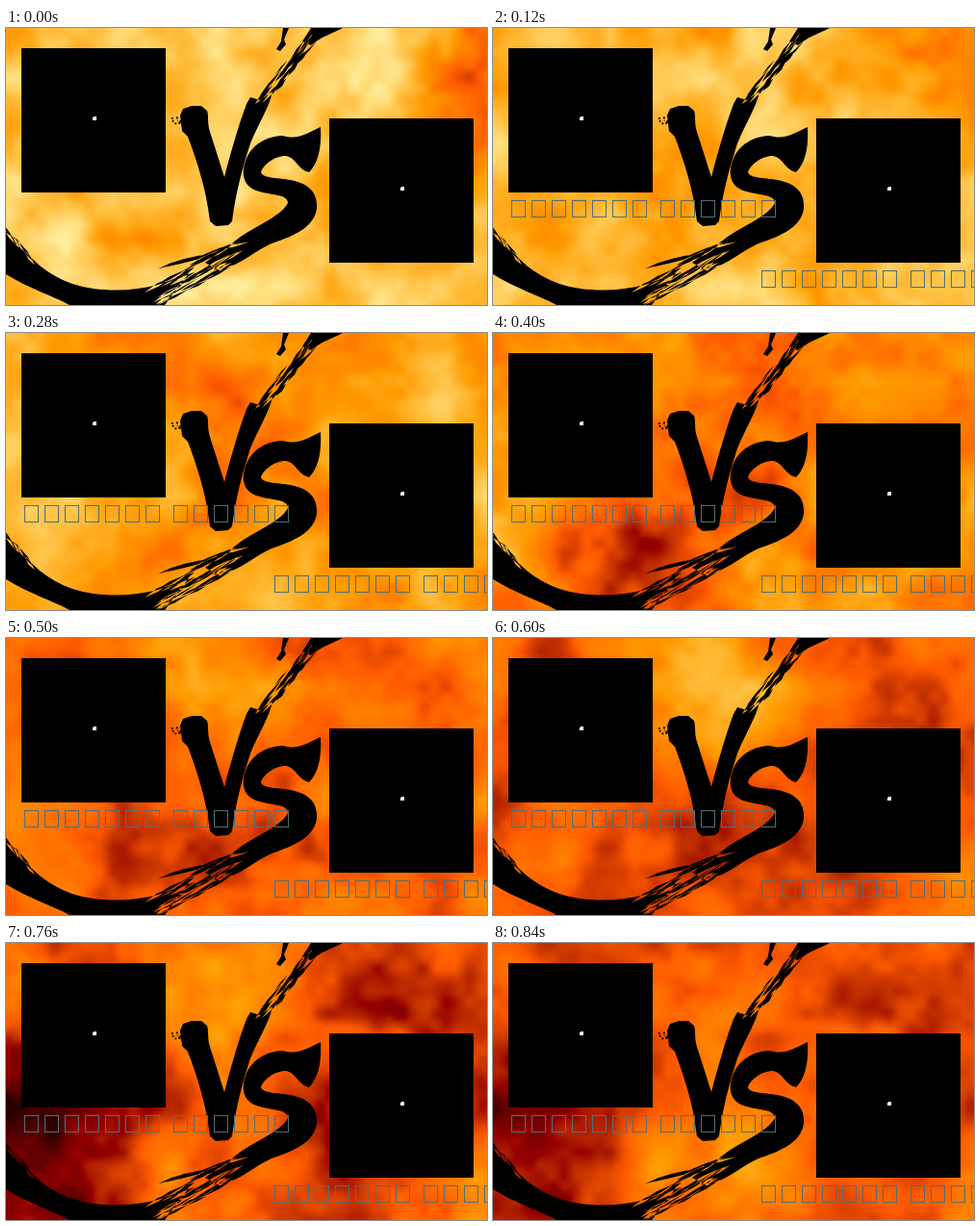
These frames come from a looping animation (500x288 px, 0.86 s). An HTML page with a canvas:

```html
<!DOCTYPE html>
<html lang="en">
<head>
<meta charset="utf-8">
<title>VS</title>
<style>
  html, body { margin: 0; width: 100%; height: 100%; overflow: hidden; background: #000; }
  canvas { display: block; width: 500px; height: 288px; }
</style>
</head>
<body>
<canvas id="stage" width="500" height="288"></canvas>
<script>
const LOOP = 860, STEP = 20, CELL = 4, W = 125, H = 72;
const ctx = document.getElementById('stage').getContext('2d');
const fire = document.createElement('canvas');
fire.width = W;
fire.height = H;
const fireCtx = fire.getContext('2d');
const pixels = fireCtx.createImageData(W, H);

let seed = 7;
const random = () => (seed = seed * 16807 % 2147483647) / 2147483647;
const between = (a, b) => a + (b - a) * random();
const mix = (a, b, k) => a + (b - a) * k;
const ease = k => k * k * (3 - 2 * k);
const clamp = (v, lo, hi) => Math.max(lo, Math.min(hi, v));

// Value noise that changes over time
const lattice = Float32Array.from({ length: 4096 }, random);
function noise(x, y, z) {
  const i = Math.floor(x), j = Math.floor(y), k = Math.floor(z);
  const u = ease(x - i), v = ease(y - j);
  const at = (a, b, c) => lattice[(a * 37 + b * 613 + c * 1291) & 4095];
  const layer = c => mix(mix(at(i, j, c), at(i + 1, j, c), u),
                         mix(at(i, j + 1, c), at(i + 1, j + 1, c), u), v);
  return mix(layer(k), layer(k + 1), z - k) - 0.5;
}

// Passing flares and cool patches
const SPOTS = [
  { x: 495, y: 60, t: 40, heat: -3 },
  { x: 350, y: 60, t: 0, heat: 1.2 },
  { x: 240, y: 100, t: 330, heat: -1.8 },
  { x: 140, y: 220, t: 400, heat: -2 },
  { x: 10, y: 200, t: 370, heat: 1.5 },
  { x: 220, y: 50, t: 640, heat: 2.6 },
  { x: 500, y: 270, t: 680, heat: 2.4 },
  { x: 310, y: 190, t: 680, heat: -1.8 },
  { x: 10, y: 200, t: 790, heat: -2.4 },
  { x: 260, y: 230, t: 850, heat: 3 }
];
const bell = (d, width) => Math.exp(-((d / width) ** 2));

// Heat runs from 0 (dark red) to 9 (pale yellow)
function heatColor(h) {
  return [
    Math.min(255, 40 + 56 * h),
    236 * (Math.max(0, h - 2) / 7) ** 0.72,
    155 * (Math.max(0, h - 5.8) / 3.2) ** 1.1
  ];
}

function drawFire(t) {
  const base = 5.3 + 2 * Math.cos(Math.PI * t / 780), z = t / 130;
  const active = SPOTS.map(s => ({ ...s, heat: s.heat * bell(t - s.t, 130) }));
  for (let y = 0, p = 0; y < H; y++) {
    for (let x = 0; x < W; x++, p += 4) {
      let h = base + 3 * noise(x / 14, y / 14, z) + 1.5 * noise(x / 6 + 20, y / 6, z + 9)
            + 0.8 * noise(x / 3, y / 3 + 40, z + 5);
      for (const s of active) h += s.heat * bell(Math.hypot(x * CELL - s.x, y * CELL - s.y), 85);
      pixels.data.set([...heatColor(clamp(h, 0, 9)), 255], p);
    }
  }
  fireCtx.putImageData(pixels, 0, 0);
  ctx.drawImage(fire, 0, 0, W * CELL, H * CELL);
}

const ink = new Path2D();
const add = d => ink.addPath(new Path2D(d));
// Letter V
add(`M181 91 L184 84 L193 81 L203 81 L209 86 C211 92 209 98 212 108
  L227 155 C233 132 241 103 250 79 L254 72 L264 75 L277 66
  C274 82 261 102 254 120 C246 145 239 170 235 201 L231 205 L218 206 L212 201
  C208 166 198 137 189 113 L183 107 Z`);
// Letter S, running into the sweep
add(`M327 103 C328 121 326 139 315 150 C303 147 302 135 291 133 C278 133 267 143 265 150
  C267 157 283 155 300 159 C319 164 324 175 323 188 C320 207 300 216 276 224
  C260 231 246 245 222 252 L207 244 L240 220 C256 207 285 197 293 182
  C293 172 274 174 260 169 C247 164 244 152 249 138 C255 121 272 112 288 112
  C303 117 316 108 327 103 Z`);
// Sweep at the bottom left
add(`M0 213 L12 220 C24 240 43 257 69 266 C97 275 131 274 158 267 L190 255
  L165 288 L66 288 C48 278 24 271 0 256 Z`);
// Slash at the top right
add('M317 0 L350 0 C338 6 326 10 317 18 L308 14 Z');
add('M288 0 L294 0 L289 12 L291 17 L285 24 L281 22 L286 14 Z');

// Tapered bristle mark centred on a point
function bristle(x, y, angle, length, width) {
  const dx = Math.cos(angle) * length / 2, dy = Math.sin(angle) * length / 2;
  const nx = -Math.sin(angle) * width, ny = Math.cos(angle) * width;
  add(`M${x - dx} ${y - dy} L${x + nx} ${y + ny} L${x + dx} ${y + dy} L${x - nx} ${y - ny} Z`);
}

// Dry brush: scattered bristles along a line
function dryBrush(x1, y1, x2, y2, spread, count) {
  const angle = Math.atan2(y2 - y1, x2 - x1);
  for (let i = 0; i < count; i++) {
    const k = i / (count - 1), off = between(-spread, spread);
    bristle(mix(x1, x2, k) - Math.sin(angle) * off, mix(y1, y2, k) + Math.cos(angle) * off,
            angle + between(-0.06, 0.06), between(16, 40), between(0.7, 2));
  }
}
dryBrush(314, 14, 268, 72, 6, 22);
dryBrush(160, 277, 234, 236, 11, 34);
dryBrush(172, 246, 236, 226, 3, 6);
dryBrush(2, 210, 24, 240, 3, 6);

// Splatter beside the V
for (let i = 0; i < 7; i++) {
  const x = between(172, 182), y = between(90, 101), r = between(0.6, 1.5);
  ink.moveTo(x + r, y);
  ink.arc(x, y, r, 0, 7);
}

function drawPanel(x, y) {
  ctx.fillStyle = '#000';
  ctx.fillRect(x, y, 150, 150);
  ctx.fillStyle = '#fff';
  ctx.fillRect(x + 75, y + 71, 3, 1);
  ctx.fillRect(x + 74, y + 72, 4, 3);
}

// A seven-glyph word and a six-glyph word of empty boxes
function drawBoxes(x, y) {
  ctx.strokeStyle = '#506f78';
  ctx.lineWidth = 1;
  for (let i = 0; i < 13; i++) ctx.strokeRect(x + i * 21 + (i > 6 ? 8 : 0), y, 14, 17);
}

function draw(t) {
  drawFire(t);
  ctx.fillStyle = '#000';
  ctx.fill(ink);
  drawPanel(16, 21);
  drawPanel(336, 94);
  if (t > 0) {
    drawBoxes(19.5, 179.5);
    drawBoxes(279.5, 252.5);
  }
}

let shown = -1;
function tick() {
  const t = Math.floor(performance.now() % LOOP / STEP) * STEP;
  if (t !== shown) draw(shown = t);
  requestAnimationFrame(tick);
}
tick();
</script>
</body>
</html>
```
